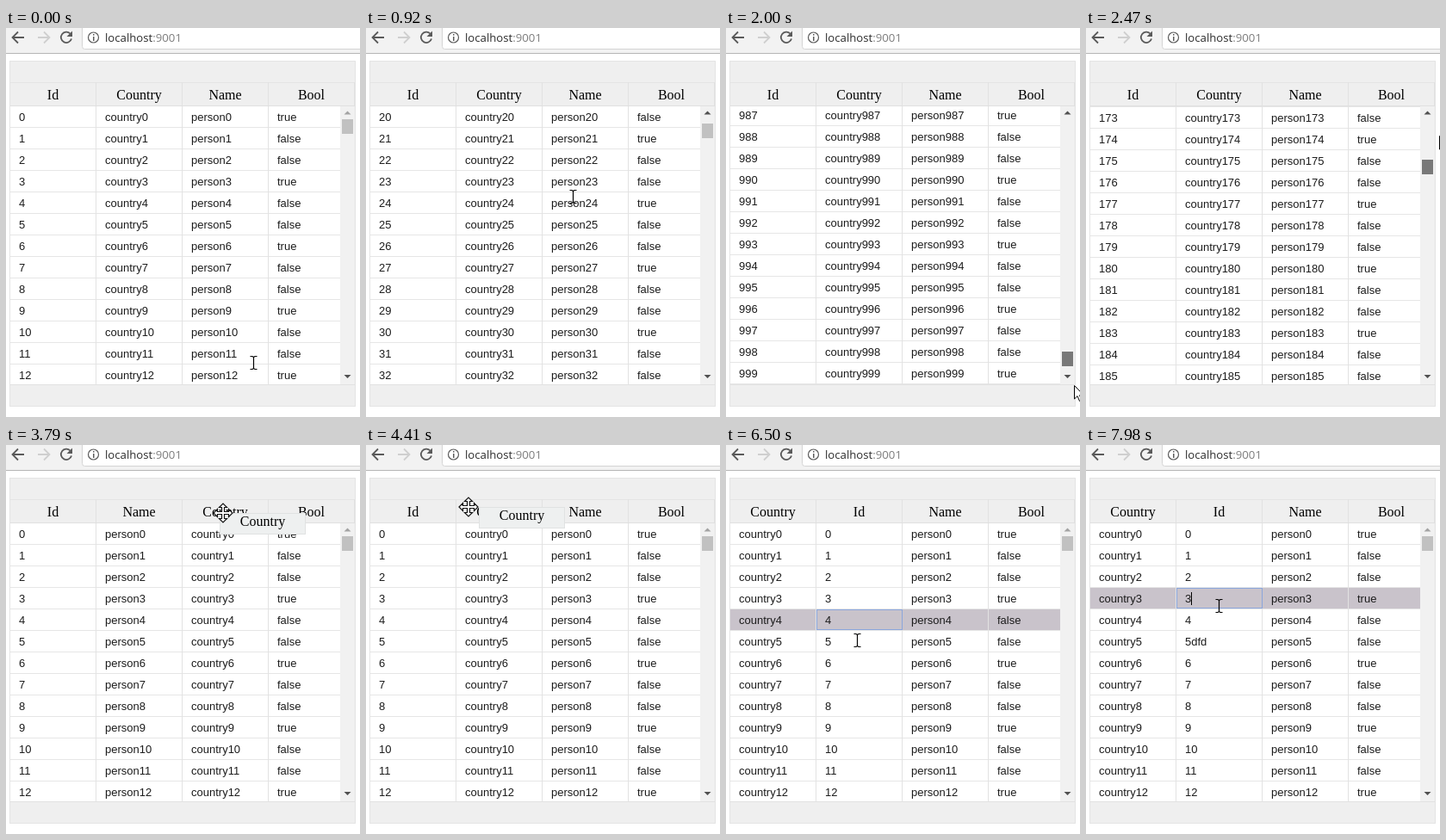
Recreate the animation shown at these times as an HTML page with a canvas. Size 411 px wide and 452 px high, loop 8 s.

```html
<!DOCTYPE html>
<html>
<head>
<meta charset="utf-8">
<title>Data grid</title>
<style>
html, body { margin: 0; width: 100%; height: 100%; overflow: hidden; background: #fff; }
canvas { display: block; }
</style>
</head>
<body>
<canvas id="stage" width="411" height="452"></canvas>
<script>
const ctx = document.getElementById('stage').getContext('2d');
const LOOP = 8000, TICK = LOOP / 104, MOVE_TICKS = 3;
const ROW = 25, ROWS = 1000, COL = 100, LEFT = 5, RIGHT = 388, TOP = 91, BOTTOM = 414;
const MAX_SCROLL = ROWS * ROW - (BOTTOM - TOP), SCROLL_PER_PIXEL = 91.4, GRIP = 113.33;
const BODY_FONT = '13px "Liberation Sans", Arial, sans-serif';
const HEAD_FONT = '16px "Liberation Serif", "Times New Roman", serif';
const BAR_FONT = '13.2px "Open Sans", sans-serif';

// Pointer stops: [arrival tick, x, y]. Each move takes at most MOVE_TICKS.
const STOPS = [
  [0, 287, 389], [3, 240, 196], [16, 396, 122], [21, 396, 208], [25, 404, 415],
  [29, 408, 231.9], [32, 410, 125], [34, 408, 76], [42, 167, 69], [44, 164, 74],
  [49, 252, 79], [54, 330, 79], [57, 119, 72], [61, 38, 70], [67, 120, 110],
  [71, 150, 159], [76, 150, 122], [79, 150, 251], [81, 152, 206], [83, 151, 226],
  [86, 155, 228], [96, 156, 194], [101, 154, 187]
];
const CLICKS = [73, 81, 85, 100], SELECT_DELAY = 3;
const WHEEL = { start: 6, notches: 8 };
const THUMB_DRAG = { start: 18, end: 37 };
const COLUMN_DRAG = { hover: 44, start: 46, drop: 61, end: 64 };
const TYPING = { hide: 91, start: 92, text: 'dfd', row: 5 };

const clamp = (v, min, max) => Math.min(max, Math.max(min, v));
const within = (tick, span) => tick >= span.start && tick < span.end;

function pointer(tick) {
  const next = STOPS.findIndex(stop => stop[0] > tick);
  const [end, x1, y1] = STOPS.at(next);
  if (next < 0) return { x: x1, y: y1 };
  const [begin, x0, y0] = STOPS[next - 1];
  const duration = Math.min(MOVE_TICKS, end - begin);
  const p = Math.max(0, 1 - (end - tick) / duration);
  return { x: x0 + (x1 - x0) * p, y: y0 + (y1 - y0) * p };
}

// The page follows a dragged thumb one tick behind the pointer.
function scrollAt(tick) {
  if (tick < THUMB_DRAG.start) return clamp(tick - WHEEL.start, 0, WHEEL.notches) * 100;
  if (tick >= THUMB_DRAG.end) return 0;
  return Math.round(clamp((pointer(tick - 1).y - GRIP) * SCROLL_PER_PIXEL, 0, MAX_SCROLL));
}

// The dragged column takes the slot below the pointer.
function columnsAt(tick) {
  const { x } = pointer(clamp(tick, COLUMN_DRAG.start, COLUMN_DRAG.drop));
  const columns = ['Id', 'Name', 'Bool'];
  columns.splice(clamp(Math.floor((x - LEFT) / COL), 0, 3), 0, 'Country');
  return columns;
}

function clickedRow(tick) {
  const click = CLICKS.filter(c => c <= tick).pop();
  return click ? Math.floor((pointer(click).y - TOP) / ROW) : -1;
}

function rect(x, y, w, h, color) {
  ctx.fillStyle = color;
  ctx.fillRect(x, y, w, h);
}

function frame(x, y, w, h, color) {
  ctx.strokeStyle = color;
  ctx.lineWidth = 1;
  ctx.strokeRect(x + .5, y + .5, w - 1, h - 1);
}

function text(value, x, y, font, color = '#1c1c1c', align = 'left') {
  ctx.font = font;
  ctx.fillStyle = color;
  ctx.textAlign = align;
  ctx.fillText(value, x, y);
}

function stroke(path, color, width) {
  ctx.strokeStyle = color;
  ctx.lineWidth = width;
  ctx.stroke(new Path2D(path));
}

function fill(path, color) {
  ctx.fillStyle = color;
  ctx.fill(new Path2D(path));
}

function drawToolbar() {
  rect(0, 0, 411, 29, '#f2f2f2');
  rect(0, 29, 411, 1, '#b6b6b6');
  ctx.beginPath();
  ctx.roundRect(88.5, -6.5, 340, 31, 3);
  ctx.fillStyle = '#fff';
  ctx.fill();
  ctx.strokeStyle = '#d4d4d4';
  ctx.lineWidth = 1;
  ctx.stroke();
  const arrow = 'M14 4.5L7.5 11L14 17.5M8 11H21';
  stroke(arrow, '#5a5a5a', 1.8);
  ctx.save();
  ctx.translate(58, 0);
  ctx.scale(-1, 1);
  stroke(arrow, '#cfcfcf', 1.8);
  ctx.restore();
  stroke('M74.5 6.5A6.2 6.2 0 1 0 76 12.5', '#5a5a5a', 1.8);
  fill('M77 3.5V10H70.5Z', '#5a5a5a');
  stroke('M95.5 11a6 6 0 1 0 12 0a6 6 0 1 0 -12 0', '#5a5a5a', 1.2);
  rect(101, 10, 1.5, 5, '#5a5a5a');
  rect(101, 7, 1.5, 1.6, '#5a5a5a');
  text('localhost', 115, 16, BAR_FONT, '#2b2b2b');
  text(':9001', 115 + ctx.measureText('localhost').width, 16, BAR_FONT, '#7d7d7d');
}

function drawHeader(columns) {
  rect(4, 38, 402, 402, '#efefef');
  frame(4, 38, 402, 402, '#e4e4e4');
  rect(LEFT, 63, 400, 1, '#e4e4e4');
  columns.forEach((name, i) => {
    text(name, 54.5 + i * COL, 83, HEAD_FONT, '#000', 'center');
    rect(104 + i * COL, 63, 1, 28, '#e2e2e2');
  });
}

function cellText(column, row, tick) {
  if (column === 'Country') return 'country' + row;
  if (column === 'Name') return 'person' + row;
  if (column === 'Bool') return String(row % 3 === 0);
  const typed = row === TYPING.row ? TYPING.text.slice(0, Math.max(0, tick - TYPING.start)) : '';
  return row + typed;
}

function drawBody(tick, columns, scroll) {
  const focused = clickedRow(tick), selected = clickedRow(tick - SELECT_DELAY);
  const first = Math.floor(scroll / ROW);
  ctx.save();
  ctx.beginPath();
  ctx.rect(LEFT, TOP, RIGHT - LEFT, BOTTOM - TOP);
  ctx.clip();
  rect(LEFT, TOP, RIGHT - LEFT, BOTTOM - TOP, '#fff');
  for (let row = first; row < Math.min(first + 15, ROWS); row++) {
    const y = TOP + row * ROW - scroll;
    if (row === selected) rect(LEFT, y, RIGHT - LEFT, ROW - 1, '#c9c3cb');
    rect(LEFT, y + ROW - 1, RIGHT - LEFT, 1, '#e6e6e6');
    columns.forEach((column, i) => {
      const value = cellText(column, row, tick), x = LEFT + i * COL;
      rect(x + COL - 1, y, 1, ROW, '#e2e2e2');
      text(value, x + 10, y + 17, BODY_FONT);
      if (column !== 'Id' || row !== focused) return;
      frame(x, y, COL, ROW - 1, '#8ba6dc');
      const caret = x + 10 + Math.round(ctx.measureText(value).width);
      if (tick >= CLICKS[2]) rect(caret, y + 5, 1, 15, '#000');
    });
  }
  ctx.restore();
  rect(LEFT, 90, 400, 1, '#e0e0e0');
  rect(LEFT, BOTTOM, 400, 1, '#e2e2e2');
}

function drawScrollbar(tick, scroll) {
  rect(RIGHT, TOP, 16, BOTTOM - TOP, '#f1f1f1');
  fill('M392.5 100.5L396.5 96.5L400.5 100.5Z', scroll > 0 ? '#505050' : '#a3a3a3');
  fill('M392.5 403L396.5 407L400.5 403Z', '#505050');
  const color = within(tick, THUMB_DRAG) ? '#787878' : '#c1c1c1';
  rect(390, 106 + Math.round(scroll / SCROLL_PER_PIXEL), 13, 17, color);
}

function drawGhost(tick) {
  if (!within(tick, COLUMN_DRAG)) return;
  const behind = pointer(tick - .16);
  const x = Math.round(behind.x + .9), y = Math.round(behind.y);
  rect(x, y, COL, ROW, '#eef0f0');
  frame(x, y, COL, ROW, '#e0e2e2');
  text('Country', x + 50, y + 15, HEAD_FONT, '#000', 'center');
}

const CURSORS = {
  arrow() {
    const path = 'M.5 .5V16L4 12.7L6.5 18.5L9 17.4L6.5 11.8H11.5Z';
    fill(path, '#fff');
    stroke(path, '#000', 1);
  },
  beam() {
    stroke('M-3.5 -7.5H-1L.5 -6.5L2 -7.5H4.5M.5 -7V7M-3.5 7.5H-1L.5 6.5L2 7.5H4.5', '#000', 1.2);
  },
  move() {
    const path = 'M-1.5 -1.5V-6.5H-4.5L0 -11L4.5 -6.5H1.5V-1.5H6.5V-4.5L11 0L6.5 4.5V1.5H1.5V6.5H4.5' +
      'L0 11L-4.5 6.5H-1.5V1.5H-6.5V4.5L-11 0L-6.5 -4.5V-1.5Z';
    fill(path, '#fff');
    stroke(path, '#111', 1.2);
  }
};

function cursorShape(tick, { x, y }) {
  if (tick >= COLUMN_DRAG.hover && tick < COLUMN_DRAG.end) return 'move';
  return x < RIGHT && y > TOP ? 'beam' : 'arrow';
}

function drawPointer(tick) {
  if (tick >= TYPING.hide && tick < TYPING.start + 2) return;
  const at = pointer(tick);
  ctx.save();
  ctx.translate(Math.round(at.x), Math.round(at.y));
  CURSORS[cursorShape(tick, at)]();
  ctx.restore();
}

function draw(now) {
  const tick = Math.floor(now % LOOP / TICK);
  const columns = columnsAt(tick), scroll = scrollAt(tick);
  rect(0, 0, 411, 452, '#fff');
  drawToolbar();
  drawHeader(columns);
  drawBody(tick, columns, scroll);
  drawScrollbar(tick, scroll);
  drawGhost(tick);
  drawPointer(tick);
  requestAnimationFrame(draw);
}
requestAnimationFrame(draw);
</script>
</body>
</html>
```
